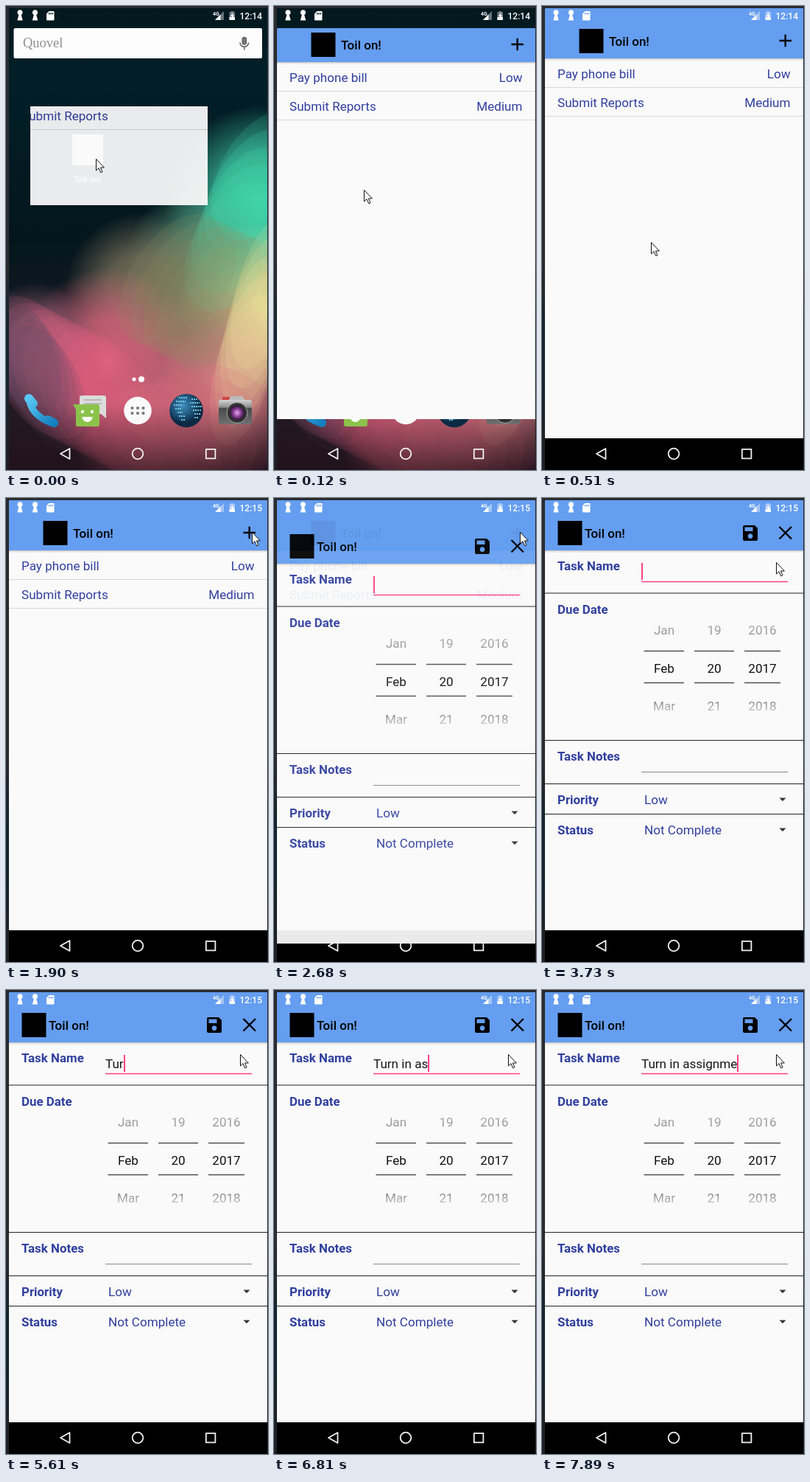
Recreate the animation shown at these times as an HTML page with a canvas. Size 356 by 629 pixels, loop 8000 ms.

```html
<!DOCTYPE html>
<html lang="en">
<head>
<meta charset="utf-8">
<title>Task list demo</title>
<style>
html, body { margin: 0; width: 100%; height: 100%; overflow: hidden; background: #1d2226; }
#stage { position: relative; width: 356px; height: 629px; overflow: hidden;
  background: linear-gradient(#2a2b2e 0 55%, #12242c 70% 80%, #202024); }
#stage svg, .win, .body { position: absolute; left: 0; top: 0; width: 356px; height: 629px; }
#wall { position: absolute; left: 4px; top: 3px; }
text, #field { font: 17.1px Roboto, sans-serif; }
.ink { fill: #303f9f; }
.bold { font-weight: 700; font-size: 16.9px; }
.title { font-weight: 500; font-size: 17px; }
.end { text-anchor: end; }
.mid { text-anchor: middle; }
#field { position: absolute; left: 135px; top: 88px; height: 23px; line-height: 24px;
  white-space: pre; color: #161616; display: flex; }
#caret { width: 1.5px; height: 23px; background: #ff4081; }

#list, #list .body, #form, #form .body, #dock, #caret, #cursor {
  animation: 8s step-end infinite; }
#list { animation-name: list; }
#list .body { animation-name: listRise; }
#form { animation-name: form; }
#form .body { animation-name: formRise; }
#dock { animation-name: dock; }
#caret { animation-name: blink; }
#cursor { animation-name: move; }

@keyframes list {
  0% { clip-path: inset(136px 82.5px 359px 33px); opacity: .94; }
  1.5% { clip-path: inset(30px 1px 69px 4px); opacity: 1; }
  3% { clip-path: inset(3px 1px 42px 4px); opacity: 1; }
  4.5%, 100% { clip-path: inset(3px 1px 43px 4px); opacity: 1; }
}
@keyframes listRise {
  0% { transform: translateY(18px); }
  1.5% { transform: translateY(5px); }
  3% { transform: translateY(1px); }
  4.5%, 100% { transform: none; }
}
@keyframes form {
  0% { clip-path: inset(30px 1px 25px 4px); opacity: 0; }
  33.5% { clip-path: inset(30px 1px 25px 4px); opacity: .94; }
  35% { clip-path: inset(3px 1px 42px 4px); opacity: 1; }
  36.875%, 100% { clip-path: inset(3px 1px 43px 4px); opacity: 1; }
}
@keyframes formRise {
  0% { transform: translateY(18px); }
  35% { transform: translateY(1px); }
  36.875%, 100% { transform: none; }
}
@keyframes dock { 0% { opacity: 0; } 3%, 100% { opacity: 1; } }
@keyframes blink {
  0%, 46.625%, 58.25%, 67.125%, 100% { opacity: 1; }
  40.375%, 51.625%, 65.25% { opacity: 0; }
}
@keyframes move {
  0% { transform: translate(122px, 207px); }
  1.5% { transform: translate(122px, 249px); }
  3% { transform: translate(138px, 345px); }
  4.5% { transform: translate(151px, 425px); }
  6.375% { transform: translate(148px, 320px); }
  7.875% { transform: translate(144px, 221px); }
  9.75% { transform: translate(165px, 168px); }
  11.25% { transform: translate(190px, 130px); }
  13.125% { transform: translate(225px, 119px); }
  15% { transform: translate(254px, 90px); }
  16.875% { transform: translate(298px, 64px); }
  18.375% { transform: translate(333px, 48px); }
  20.25% { transform: translate(334px, 46px); }
  36.875% { transform: translate(327px, 65px); }
  38.5% { transform: translate(318px, 84px); }
  40.375%, 100% { transform: translate(318px, 87px); }
}
</style>
</head>
<body>
<div id="stage">
  <canvas id="wall" width="351" height="626"></canvas>

  <svg viewBox="0 0 356 629">
    <defs>
      <radialGradient id="sea" cx=".4" cy=".35"><stop offset="0" stop-color="#3f8fc0"/><stop offset=".8" stop-color="#174468"/><stop offset="1" stop-color="#0c2a44"/></radialGradient>
      <radialGradient id="lens"><stop offset="0" stop-color="#e9a8ee"/><stop offset=".55" stop-color="#8a3f96"/><stop offset="1" stop-color="#2a1432"/></radialGradient>
      <linearGradient id="blue" x2="1" y2="1"><stop offset="0" stop-color="#59c8f5"/><stop offset="1" stop-color="#147fbd"/></linearGradient>
      <linearGradient id="metal" x2="0" y2="1"><stop offset="0" stop-color="#d5d5d5"/><stop offset=".3" stop-color="#8d8d8d"/><stop offset=".35" stop-color="#4a4a4a"/><stop offset="1" stop-color="#707070"/></linearGradient>
    </defs>
    <!-- search bar -->
    <rect x="10.500" y="30" width="337.500" height="41" rx="2" fill="#fdfdfd"/>
    <text x="23" y="56" style="font: 18.500px 'Liberation Serif', serif" fill="#909090">Quovel</text>
    <g fill="none" stroke="#666" stroke-width="1.600">
      <rect x="321.300" y="42.500" width="5" height="9.500" rx="2.500" fill="#777"/>
      <path d="M318 49.500a5.800 5.800 0 0 0 11.600 0M323.800 55.500v4"/>
    </g>
    <!-- shortcut -->
    <rect x="90" y="174" width="42" height="42" fill="#fff"/>
    <text x="110.500" y="239" class="mid" fill="#fff" style="font-size: 11px; font-weight: 700">Toil on!</text>
    <g fill="#fff"><circle cx="174" cy="506" r="2.600"/><circle cx="184" cy="506" r="4"/></g>
    <!-- phone -->
    <g fill="none" stroke="url(#blue)" stroke-linecap="round">
      <path d="M32 534Q34 554 61 565" stroke-width="9"/>
      <path d="M31 532l6 7M57 561l8 4" stroke-width="12"/>
    </g>
    <!-- messages -->
    <path d="M103 528h30q3 0 3 3v28l-7-6h-26q-3 0-3-3v-19q0-3 3-3z" fill="#dcdcdc"/>
    <path d="M106 534h24M106 539h24" stroke="#aaa" stroke-width="1.500"/>
    <path d="M91 540h33q3 0 3 3v24q0 3-3 3h-26q-3 0-3-3v-20z" fill="#8bc34a"/>
    <g fill="#fff"><circle cx="104" cy="550" r="2.200"/><circle cx="117" cy="550" r="2.200"/><path d="M103 557h15q-2 7-7.500 7t-7.500-7z"/></g>
    <!-- all apps -->
    <circle cx="179" cy="548.500" r="18.800" fill="#fafafa"/>
    <path d="M171.500 545h15.100M171.500 552h15.100" stroke="#777" stroke-width="4.200" stroke-linecap="round" stroke-dasharray="0 7.500"/>
    <!-- globe -->
    <circle cx="245" cy="548.500" r="22.800" fill="url(#sea)"/>
    <g fill="none" stroke="#74c6dc" stroke-width="2.200" stroke-dasharray="2 1">
      <path d="M228 541h12M231 536h13M235 531h11M230 546h9M233 551h7M235 556h8M238 561h6"/>
      <path d="M252 533h8M250 538h13M252 543h14M254 548h12M256 553h8M256 558h5"/>
    </g>
    <!-- camera -->
    <rect x="294" y="530" width="10" height="6" rx="1" fill="#c44"/>
    <path d="M302 535l4-6h15l4 6z" fill="#bbb"/>
    <rect x="289" y="534" width="45" height="33" rx="3" fill="url(#metal)"/>
    <circle cx="314" cy="551.500" r="14" fill="#333" stroke="#aaa"/>
    <circle cx="314" cy="551.500" r="10" fill="url(#lens)"/>
  </svg>

  <svg id="dock" viewBox="0 0 356 629"><path d="M4 586h351v43H4z"/></svg>

  <div id="list" class="win"><div class="body">
    <svg viewBox="0 0 356 629">
      <path d="M0 0h356v660H0z" fill="#fafafa"/>
      <path d="M0 71h356v1.500H0z" fill="#c9c9c9"/><path d="M0 72.500h356v1.500H0z" fill="#ebebeb"/>
      <path d="M0-20h356v91H0z" fill="#659ef0"/>
      <rect x="50.500" y="31" width="33" height="33"/>
      <text x="91" y="53.500" class="title">Toil on!</text>
      <path d="M322.500 47h16.500M330.700 38.800v16.500" stroke="#000" stroke-width="2.400"/>
      <g class="ink">
        <text x="21" y="97.500">Pay phone bill</text><text x="337.500" y="97.500" class="end">Low</text>
        <text x="21" y="137">Submit Reports</text><text x="337.500" y="137" class="end">Medium</text>
      </g>
      <path d="M0 110.500h356M0 149.500h356" stroke="#d8d8d8"/>
    </svg>
  </div></div>

  <div id="form" class="win"><div class="body">
    <svg viewBox="0 0 356 629">
      <defs>
        <linearGradient id="up" x2="0" y2="1"><stop offset=".2" stop-color="#aaa"/><stop offset="1" stop-color="#8a8a8a"/></linearGradient>
        <linearGradient id="down" x2="0" y2="1"><stop offset=".2" stop-color="#888"/><stop offset=".85" stop-color="#c4c4c4"/></linearGradient>
      </defs>
      <path d="M0 0h356v660H0z" fill="#fafafa"/>
      <path d="M0 71h356v1.500H0z" fill="#c9c9c9"/><path d="M0 72.500h356v1.500H0z" fill="#ebebeb"/>
      <path d="M0-20h356v91H0z" fill="#659ef0"/>
      <rect x="21.500" y="31" width="33" height="33"/>
      <text x="58" y="53.500" class="title">Toil on!</text>
      <path fill-rule="evenodd" d="M275 37h14l4 4v15q0 2-2 2h-16q-2 0-2-2v-17q0-2 2-2zM275.500 39.500v5.500h11v-5.500zM283 48.300a3.400 3.400 0 1 0 .1 0z"/>
      <path d="M322.500 39l16.500 16.500M339 39l-16.500 16.500" stroke="#000" stroke-width="2.400"/>
      <g class="ink">
        <g id="labels"></g>
        <text x="139" y="414.500">Low</text><text x="139" y="455.500">Not Complete</text>
      </g>
      <g id="picker" class="mid"></g>
      <path d="M4 129h351M4 328.500h351M4 387.500h351M4 428.500h351" stroke="#222"/>
      <path d="M135 113.500h199" stroke="#ff4081" stroke-width="1.700"/>
      <path d="M135 371.500h199" stroke="#8a8a8a"/>
      <path d="M138.500 207.500h54.500m14 0h54m14 0h49M138.500 250.500h54.500m14 0h54m14 0h49" stroke="#505050" stroke-width="1.500"/>
      <path d="M322.500 406.500h9l-4.500 4.500zM322.500 447.500h9l-4.500 4.500z" fill="#333"/>
    </svg>
    <div id="field"><span id="typed"></span><i id="caret"></i></div>
  </div></div>

  <svg viewBox="0 0 356 629">
    <g fill="#fff">
      <path id="key" d="M17.300 12a3.600 3.600 0 1 1 3.400 0l2 7.500h-7.400z"/>
      <use href="#key" x="20.500"/>
      <path fill-rule="evenodd" d="M58.500 7h6q1 0 1 1v10.500q0 1-1 1h-8.500q-1 0-1-1v-8zM58 9v2.500h1.300v-2.500zM60.300 9v2.500h1.300v-2.500zM62.600 9v2.500h1.300v-2.500z"/>
      <text x="281" y="12.500" style="font-size: 7px; font-weight: 700">4G</text>
      <path d="M284 19l12-12v12z" opacity=".4"/><path d="M284 19l7.500-7.500v7.500z"/>
      <path d="M305.500 7h3.500v1.200h2v10.800h-7.500v-10.800h2z" opacity=".45"/>
      <path d="M303.500 15h7.500v4h-7.500z"/><path d="M308.200 9l-3.200 5h2v3.500l3.200-5h-2z"/>
      <text id="clock" x="348" y="18" class="end" style="font-size: 12px; font-weight: 500">12:14</text>
    </g>
    <g fill="none" stroke="#f2f2f2" stroke-width="1.800" stroke-linejoin="round">
      <path d="M86.500 600v14l-12.500-7z"/><circle cx="179" cy="607" r="7.300"/><rect x="271.800" y="600.800" width="12.600" height="12.600"/>
    </g>
    <g id="cursor"><path d="M.5.500v15.500l3.500-3.300 2.700 6.100 2.300-1-2.600-5.800h5z" fill="#fff" stroke="#111"/></g>
  </svg>
</div>

<script>
const $ = id => document.getElementById(id);

const label = (x, y, s, attrs) => `<text x="${x}" y="${y}" ${attrs}>${s}</text>`;
$('labels').innerHTML = [
  ['Task Name', 98], ['Due Date', 157], ['Task Notes', 356], ['Priority', 414.5], ['Status', 455.5]
].map(([s, y]) => label(21, y, s, 'class="bold"')).join('');

const fills = ['url(#up)', '#111', 'url(#down)'];
$('picker').innerHTML = [
  [166, 'Jan', 'Feb', 'Mar'], [234, 19, 20, 21], [299.5, 2016, 2017, 2018]
].map(([x, ...rows]) =>
  rows.map((s, i) => label(x, 185 + 51.5 * i, s, `fill="${fills[i]}"`)).join('')).join('');

function paintWall() {
  const c = $('wall').getContext('2d');
  c.translate(-4, -3);
  const fade = (g, ...stops) => {
    stops.forEach(([p, color]) => g.addColorStop(p, color));
    c.fillStyle = g;
    c.fillRect(0, 0, 356, 629);
  };
  fade(c.createLinearGradient(0, 0, 0, 629), [0, '#03181e'], [.15, '#021f28'], [.5, '#04161d'], [1, '#2c1c28']);
  // soft hue fields: x, y, radius, colour
  [
    [345, 265, 130, '#3cbd9c'], [262, 345, 100, '#4f8a72'], [185, 385, 105, '#77705a'],
    [352, 410, 120, '#d8d792'], [285, 510, 135, '#cf8181'], [140, 480, 125, '#d5627a'],
    [40, 460, 85, '#8c586e'], [200, 580, 110, '#bf6274']
  ].forEach(([x, y, r, color]) =>
    fade(c.createRadialGradient(x, y, 0, x, y, r), [0, color], [.45, color + 'c8'], [1, color + '00']));
  // stacked translucent ovals: x, y, rx, ry, tilt, step x, step y, count, colour
  [
    [345, 230, 55, 95, .5, -9, 24, 5, '#45e0b4'], [225, 370, 55, 100, .6, 17, 8, 5, '#8f8a60'],
    [350, 390, 38, 105, .25, -7, 26, 5, '#f4e9a4'], [45, 490, 60, 105, -.5, 17, 9, 7, '#e5607e'],
    [20, 470, 45, 90, -.4, 12, 16, 4, '#54485e'], [300, 560, 95, 65, .5, -24, 8, 5, '#d8697c']
  ].forEach(([x, y, rx, ry, tilt, dx, dy, n, color]) => {
    c.fillStyle = color + '26';
    for (let i = 0; i < n; i++) {
      c.beginPath();
      c.ellipse(x + dx * i, y + dy * i, rx, ry, tilt, 0, 7);
      c.fill();
    }
  });
  fade(c.createLinearGradient(0, 540, 0, 629), [0, '#1a0c1400'], [1, '#1a0c14a0']);
}
paintWall();

const entry = 'Turn in assignme';
// time in ms, letters shown
const keys = [[5370, 1], [5490, 2], [5610, 3], [5860, 4], [6110, 5], [6230, 6], [6390, 7],
  [6510, 9], [6810, 10], [7090, 12], [7240, 13], [7360, 14], [7610, 15], [7890, 16]];
let start;

function tick(now) {
  start ??= now;
  const t = (now - start) % 8000;
  const shown = keys.filter(([at]) => at <= t).pop();
  $('typed').textContent = entry.slice(0, shown ? shown[1] : 0);
  $('clock').textContent = t < 1900 ? '12:14' : '12:15';
  requestAnimationFrame(tick);
}
requestAnimationFrame(tick);
</script>
</body>
</html>
```
